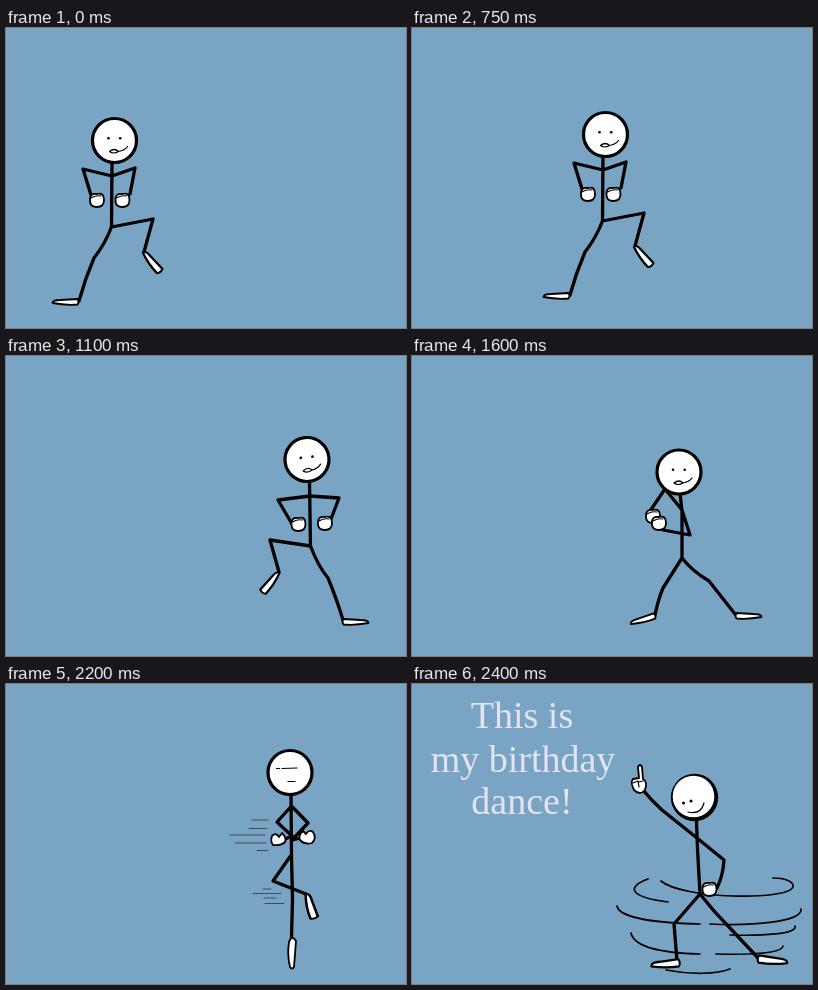
These frames come from a looping animation (400 px wide and 300 px high, 4400 ms). An HTML page:

```html
<!DOCTYPE html>
<html lang="en">
<head>
<meta charset="utf-8">
<title>Birthday dance</title>
<style>
html, body { margin: 0; height: 100%; overflow: hidden; background: #7aa4c4; }
svg { display: block; width: 100%; height: 100%; }
path, ellipse, circle { fill: none; stroke: #000; stroke-linecap: round; stroke-linejoin: round; }
.limb { stroke-width: 3.3; }
.head { fill: #fff; stroke-width: 3.2; }
.white { fill: #fff; stroke-width: 1.8; }
.thin { stroke-width: 1.2; }
.speed { stroke-width: .7; stroke-opacity: .75; }
.swirl { stroke-width: 1.7; }
.eye { fill: #000; stroke: none; }
text { font: 38px "Liberation Serif", serif; fill: #e2e4f1; text-anchor: middle; }
</style>
</head>
<body>
<svg viewBox="0 0 400 300">
  <defs>
    <g id="face">
      <circle class="head" r="22"/>
      <circle class="eye" cx="-6" cy="-2.3" r="1.3"/>
      <circle class="eye" cx="5.7" cy="-2.3" r="1.3"/>
      <path class="thin" d="M-5 11Q0 7 4 11Q-1 14-5 11M4 11Q10 10 13 6"/>
    </g>
    <g id="fist">
      <path class="white" d="M-7-2Q-6-7 0-6Q7-8 7 0Q7 7 0 7Q-7 7-7 1Z"/>
      <path class="thin" d="M-6-2Q-1-5 4-4"/>
    </g>
    <g id="shoe">
      <path class="white" d="M-13 1Q-13-2-5-2L12-3Q14 0 12 2.500Q0 3.500-13 1Z"/>
    </g>

    <g id="right">
      <path class="limb" d="M106 134L105.500 199M85 167L77 141L106 148L129 140L124 166M73 273Q79 251 88 230Q99 216 105.500 199L147 191L138 224"/>
      <use href="#face" x="108.500" y="112.500"/>
      <use href="#fist" x="91" y="172"/>
      <use href="#fist" x="116.500" y="172"/>
      <use href="#shoe" x="59.500" y="274"/>
      <use href="#shoe" transform="translate(146 234) rotate(51) scale(1 1.25)"/>
    </g>
    <g id="left">
      <path class="limb" d="M303.500 125L304.500 191M286 168L272 144L304 140L333 142L325 163M337 264Q330 241 322 222Q312 210 304.500 190L264 184L273 216"/>
      <use href="#face" transform="translate(301 103.500) rotate(-6)"/>
      <use href="#fist" x="292.500" y="168"/>
      <use href="#fist" x="319" y="167"/>
      <use href="#shoe" transform="translate(349.500 266) scale(-1 1)"/>
      <use href="#shoe" transform="translate(264.500 226.500) rotate(-52) scale(-1 1.25)"/>
    </g>
    <g id="windup">
      <path class="limb" d="M268 137L270 155L270 203M238 155L253 133L270 154L278 179L251 174M243 259Q246 244 251 232L270 202Q280 215 297 225L323 258"/>
      <use href="#face" x="267" y="116"/>
      <use href="#fist" x="241" y="160"/>
      <use href="#fist" x="247" y="167"/>
      <use href="#shoe" transform="translate(231 263.500) rotate(-16)"/>
      <use href="#shoe" transform="translate(336.500 260) scale(-1 1)"/>
    </g>
    <g id="spin">
      <path class="limb" d="M285 111L285.500 172L286.500 215L285.500 254M277 156L286 152L271 138L285.500 122L302 139L286 156L295 154M284.500 172L267 197L300 210"/>
      <circle class="head" cx="284" cy="88.500" r="22"/>
      <path class="thin" d="M270.500 84.500h3M276 84.500L291 84M282 97.500h7"/>
      <path class="white" d="M266 152Q270 148 273 153L276 149Q281 154 279 158Q275 162 267 161Q264 157 266 152ZM307 148Q303 145 300 150L297 147Q292 151 294 156Q299 161 306 159Q311 154 307 148Z"/>
      <path class="white" d="M283 258Q286 250 290 257L288 283Q286 286 284 283Q281 270 283 258Z"/>
      <use href="#shoe" transform="translate(304.500 222) rotate(74) scale(1 1.4)"/>
      <path class="speed" d="M246 136h16M243 144.500h18M224 151h35M229 159h31M251 166.500h11M257 205h8M247 209.500h28M258 214h12M259 219.500h19"/>
    </g>
    <g id="finale">
      <path class="swirl" d="M236 195C214 203 217 213 256 218M249 197C270 215 375 217 381 203C382 197 372 194 361 194M205 222C207 234 245 239 288 240M389 225C391 238 340 242 298 240M383 242C386 250 350 252 318 251M219 249C222 263 250 269 288 270M371 262C370 269 340 271 304 270M254 286C280 291 305 290 318 285"/>
      <path class="limb" d="M284.500 137L285.500 165L288 210M231 106Q240 117 250 126L285 154L312 176Q311 192 305 204M265 277L262 240L288 210Q302 228 317 243L347 275"/>
      <circle class="eye" cx="282.500" cy="113.500" r="23.700"/>
      <circle cx="281.500" cy="112.500" r="20.800" style="fill:#fff;stroke:none"/>
      <circle class="eye" cx="271.500" cy="119" r="1.500"/>
      <circle class="eye" cx="279" cy="117" r="1.500"/>
      <path class="thin" d="M276 128Q289 131 292 119"/>
      <path class="white" d="M227 94L226 83Q228 79 230 83L231 95Q236 98 233 106Q228 112 222 106Q218 98 221 95Z"/>
      <path class="thin" d="M221 99L226 97L227 103M227 98L231 97"/>
      <use href="#fist" x="297.500" y="205"/>
      <use href="#shoe" transform="translate(253.500 280) rotate(-4) scale(1.1 1.3)"/>
      <use href="#shoe" transform="translate(360.500 276.500) rotate(5) scale(-1.15 1.3)"/>
      <text x="110" y="44">This is</text>
      <text x="111" y="88">my birthday</text>
      <text x="110" y="130">dance!</text>
    </g>
  </defs>
  <use id="dancer"/>
</svg>
<script>
const LOOP = 4400;
// start time, pose, placement
const steps = [
  [0, "right", ""],
  [350, "left", "translate(-137 4)"],
  [750, "right", "translate(85 -6)"],
  [1100, "left", ""],
  [1400, "right", "translate(134 2)"],
  [1600, "windup", ""],
  [2200, "spin", ""],
  [2300, "spin", "translate(571 0) scale(-1 1)"],
  [2400, "finale", ""]
];
const dancer = document.getElementById("dancer");
const origin = performance.now();
let current;

function show(now) {
  const time = Math.max(0, now - origin) % LOOP;
  const step = steps.findLast(([start]) => start <= time);
  if (step !== current) {
    current = step;
    dancer.setAttribute("href", "#" + step[1]);
    dancer.setAttribute("transform", step[2]);
  }
  requestAnimationFrame(show);
}
show(origin);
</script>
</body>
</html>
```
